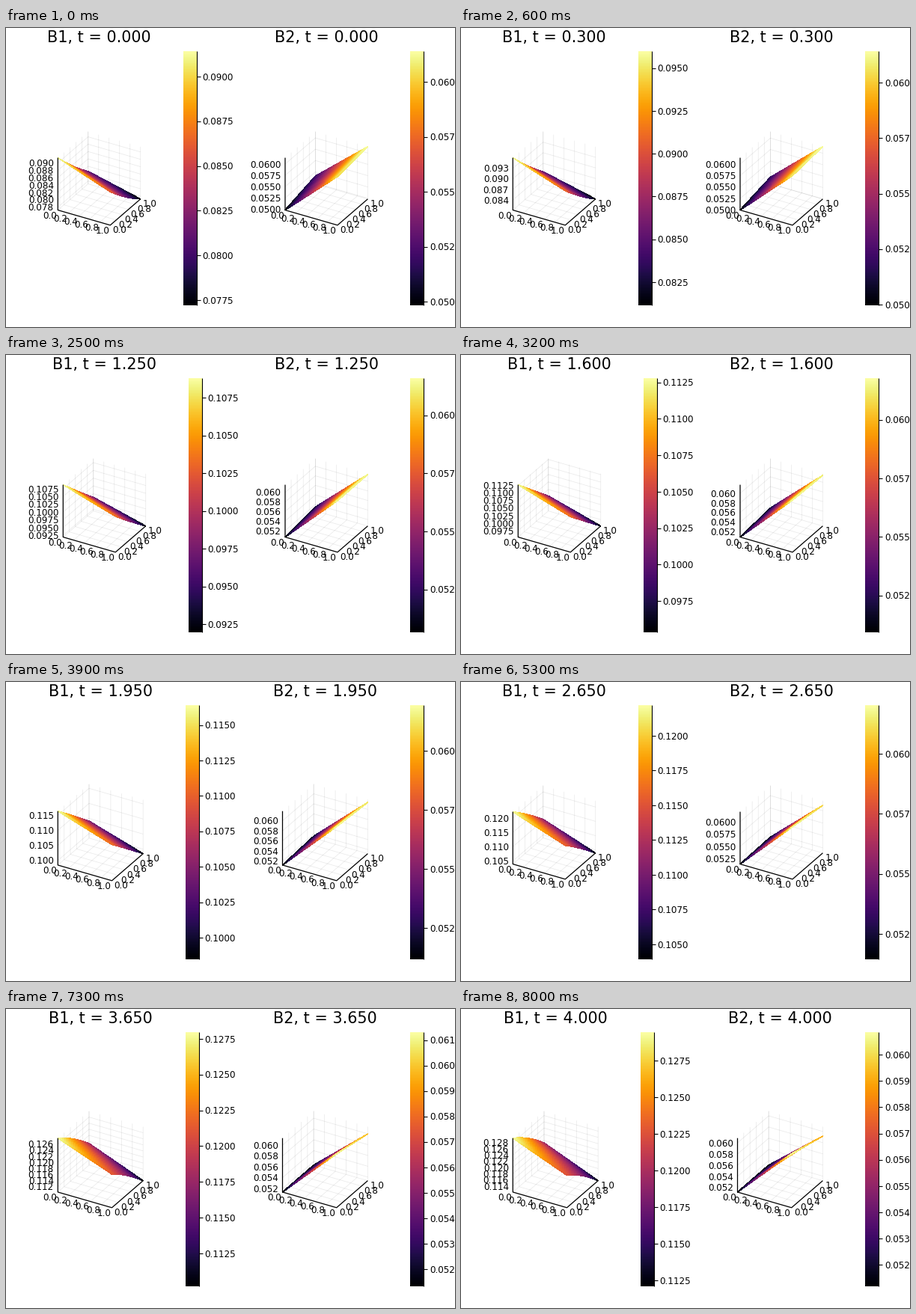
Animation, 600 px wide and 400 px high, one loop 8100 ms. Source, as a matplotlib script:

```python
import math

import numpy as np
import matplotlib.pyplot as plt
from matplotlib.animation import FuncAnimation
from matplotlib.collections import LineCollection, PolyCollection

WIDTH, HEIGHT, DPI = 600, 400, 100
FRAMES, INTERVAL, DT = 81, 100, 0.05
PX = 72 / DPI
BAR_TOP, BAR_BOTTOM, BAR_WIDTH = 31, 371, 18
MID_Y = 201.2
CELLS = 28

plt.rcParams["font.family"] = "DejaVu Sans"
cmap = plt.get_cmap("inferno")
gradient = np.linspace(1, 0, 256)[:, None]

KEY_T = np.array([0, 0.7, 1.25, 1.95, 2.65, 3.65, 4.0])


def curve(*values, degree=3):
    """Smooth trend through the key times, corrected to pass each key value."""
    values = np.array(values)
    trend = np.polyfit(KEY_T, values, degree)
    rest = values - np.polyval(trend, KEY_T)
    return lambda t: float(np.polyval(trend, t) + np.interp(t, KEY_T, rest))


# Value range over time, and relative heights of the corners (1,0), (0,1), (1,1).
FIELDS = [
    dict(
        name="B1",
        low=curve(0.07721, 0.08598, 0.09196, 0.09847, 0.10392, 0.1102, 0.11209),
        high=curve(0.09142, 0.10163, 0.10879, 0.1164, 0.1222, 0.12797, 0.12944),
        origin=lambda t: 1.0,
        right=curve(0.64, 0.673, 0.685, 0.67, 0.645, 0.62, 0.60),
        back=curve(0.24, 0.235, 0.26, 0.315, 0.355, 0.40, 0.41),
        far=lambda t: 0.0,
        bend=lambda t: -0.03 + 0.0175 * t,
    ),
    dict(
        name="B2",
        low=curve(0.04983, 0.0502, 0.05065, 0.05117, 0.05144, 0.05133, 0.05119),
        high=curve(0.061395, 0.06153, 0.0616, 0.06193, 0.06202, 0.06131, 0.06085),
        origin=lambda t: 0.0,
        right=curve(0.93, 0.965, 0.985, 1.0, 1.0, 1.0, 1.0),
        back=curve(0.15, 0.10, 0.075, 0.035, 0.015, 0.0, 0.0),
        far=curve(1.0, 1.0, 0.985, 0.95, 0.91, 0.866, 0.825),
        bend=lambda t: 0.0,
    ),
]


def ticks_inside(low, high, step):
    first = math.ceil(low / step - 1e-9)
    last = math.floor(high / step + 1e-9)
    return [i * step for i in range(first, last + 1)]


def axis_ticks(low, high):
    """Choose the step that scores best on tick count, coverage and niceness."""
    best, best_score = None, -1
    for step, nice in ((0.005, 0.9), (0.003, 0.2), (0.0025, 0.5), (0.002, 0.7)):
        ticks = ticks_inside(low, high, step)
        n = len(ticks)
        if not 4 <= n <= 8:
            continue
        score = (1 - abs(n - 5) / 5) / 4 + nice / 4
        score += 0.5 * (high - low) / ((n - 1) * step)
        if score > best_score + 1e-9:
            best, best_score = (ticks, 4 if step == 0.0025 else 3), score
    return best


def label(x, y, text, align, size=12):
    ax.text(x, y, text, ha=align, va="baseline", fontsize=size * PX, color="black")


def draw_lines(lines, **style):
    ax.add_collection(LineCollection(lines, **style))


def projector(x0, width):
    """Orthographic view of the unit cube, 30 degrees round and 30 degrees up."""
    s = width / (math.cos(math.pi / 6) + 0.5)
    cos30 = math.cos(math.pi / 6)
    base = MID_Y + s * (0.25 + 0.5 * cos30 + cos30) / 2 - 0.25 * s

    def project(x, y, z):
        return (x0 + s * (cos30 * x + 0.5 * y),
                base + s * (0.25 * x - 0.5 * cos30 * y - cos30 * z))
    return project


def draw_surface(field, t, project):
    u = np.linspace(0, 1, CELLS + 1)
    x, y = np.meshgrid(u, u)
    z = ((1 - x) * (1 - y) * field["origin"](t) + x * (1 - y) * field["right"](t)
         + (1 - x) * y * field["back"](t) + x * y * field["far"](t)
         + 4 * field["bend"](t) * y * (1 - y))
    z = np.clip(z, 0, 1)
    points = np.stack(project(x, y, z), axis=-1)
    quads = np.stack([points[:-1, :-1], points[:-1, 1:],
                      points[1:, 1:], points[1:, :-1]], axis=2)
    mean = (z[:-1, :-1] + z[:-1, 1:] + z[1:, 1:] + z[1:, :-1]) / 4
    # Rows run from the back of the cube to the front.
    quads = quads[::-1].reshape(-1, 4, 2)
    colors = cmap(mean[::-1].ravel())
    ax.add_collection(PolyCollection(quads, facecolors=colors, edgecolors=colors,
                                     linewidths=0.4, antialiaseds=False, zorder=3))


def draw_axes(project, low, high, ticks, decimals):
    fifths = np.linspace(0, 1, 6)
    heights = [(v - low) / (high - low) for v in ticks]
    paths = [[(v, 0, 0), (v, 1, 0), (v, 1, 1)] for v in fifths]
    paths += [[(1, v, 0), (0, v, 0), (0, v, 1)] for v in fifths]
    paths += [[(0, 0, h), (0, 1, h), (1, 1, h)] for h in heights]
    draw_lines([[project(*p) for p in path] for path in paths],
               colors="black", alpha=0.08, linewidths=0.6, zorder=1)
    frame = [(0, 0, 1), (0, 0, 0), (1, 0, 0), (1, 1, 0)]
    draw_lines([[project(*p) for p in frame]],
               colors="black", linewidths=0.9, zorder=4)

    for v in fifths:
        x, y = project(v, 0, 0)
        label(x - 1.2, y + 11, f"{v:.1f}", "right")
        x, y = project(1, v, 0)
        label(x + 3.2, y + 10.2, f"{v:.1f}", "left")
    for value, h in zip(ticks, heights):
        x, y = project(0, 0, h)
        label(x - 5.5, y + 4.6, f"{value:.{decimals}f}", "right")


def draw_colorbar(left, low, high):
    right = left + BAR_WIDTH
    ax.imshow(gradient, cmap=cmap, extent=(left, right, BAR_BOTTOM, BAR_TOP),
              vmin=0, vmax=1, aspect="auto", interpolation="nearest", zorder=2)
    step, decimals = (0.0025, 4) if high - low > 0.01 else (0.001, 3)
    lines = [[(right, BAR_TOP), (right, BAR_BOTTOM)]]
    for value in ticks_inside(low, high, step):
        y = BAR_BOTTOM - (value - low) / (high - low) * (BAR_BOTTOM - BAR_TOP)
        lines.append([(right, y), (right + 5, y)])
        label(right + 7.5, y + 4.6, f"{value:.{decimals}f}", "left")
    draw_lines(lines, colors="black", linewidths=0.8, zorder=4)


def draw(frame):
    t = frame * DT
    ax.clear()
    ranges = [(f["low"](t), f["high"](t)) for f in FIELDS]
    ticks = [axis_ticks(*r) for r in ranges]
    # A longer height label takes room from both plots.
    extra = [decimals - 3 for _, decimals in ticks]
    width = 113.9 - 3.5 * sum(extra)
    starts = [69.3 + 7 * extra[0], 483.4 - width]

    for field, x0, (low, high), (values, decimals) in zip(FIELDS, starts, ranges, ticks):
        project = projector(x0, width)
        draw_axes(project, low, high, values, decimals)
        draw_surface(field, t, project)
        draw_colorbar(x0 + width + 57, low, high)
        label(x0 + width / 2, 18.7, f"{field['name']}, t = {t:.3f}", "center", 20.8)

    ax.set_xlim(0, WIDTH)
    ax.set_ylim(HEIGHT, 0)
    ax.set_aspect("auto")
    ax.axis("off")
    return []


fig = plt.figure(figsize=(WIDTH / DPI, HEIGHT / DPI), dpi=DPI, facecolor="white")
ax = fig.add_axes([0, 0, 1, 1])
animation = FuncAnimation(fig, draw, frames=FRAMES, interval=INTERVAL,
                          init_func=lambda: [], repeat=True, repeat_delay=0)
plt.show()
```
